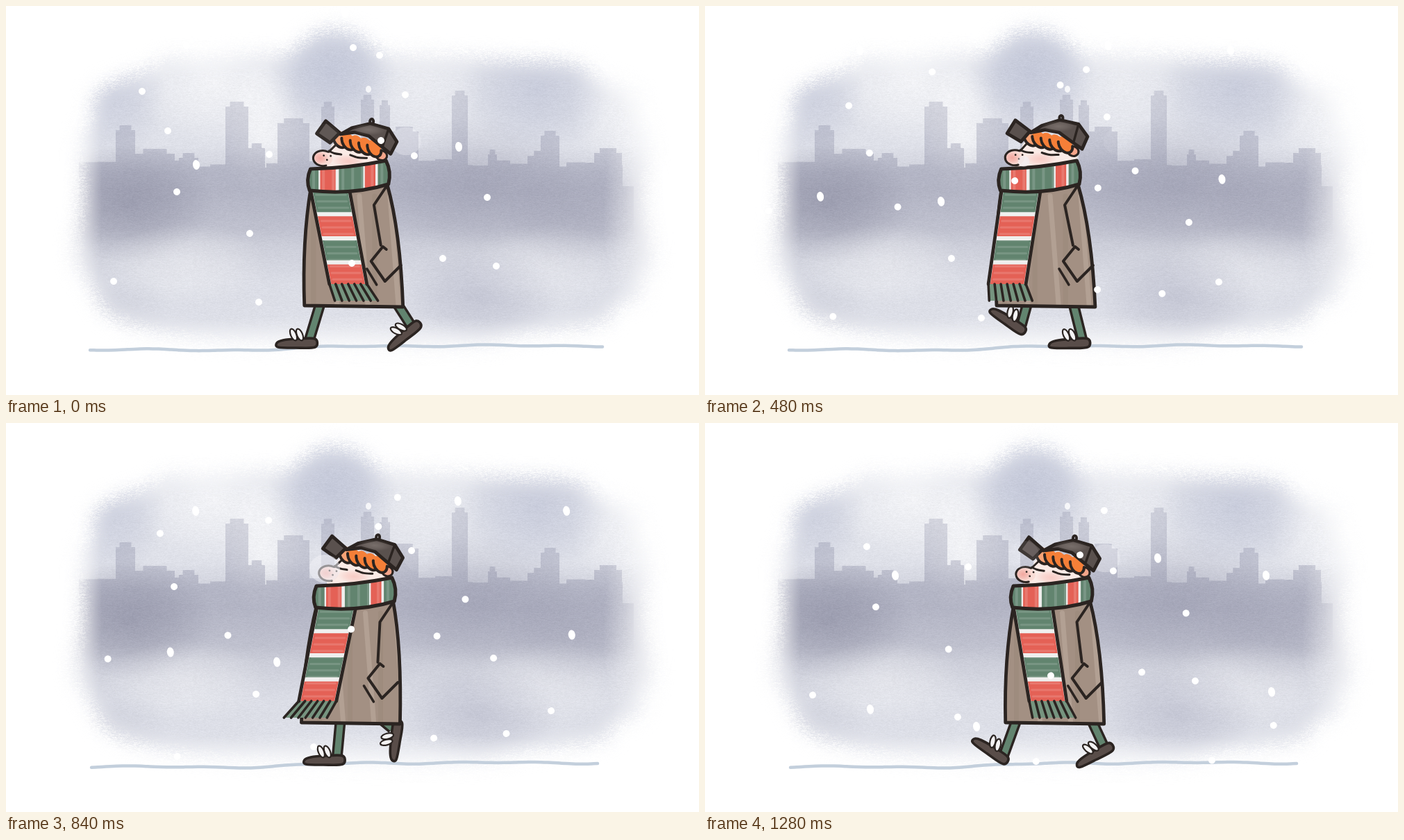
An HTML page with a canvas for the animation above (1.32 s loop, 998 by 561 pixels).

```html
<!DOCTYPE html>
<html lang="en">
<head>
<meta charset="utf-8">
<title>Winter walk</title>
<style>
html, body { margin: 0; width: 100%; height: 100%; overflow: hidden; background: #fff; }
canvas { display: block; width: 998px; height: 561px; }
</style>
</head>
<body>
<canvas id="stage" width="998" height="561"></canvas>
<script>
const W = 998, H = 561, LOOP = 1320, STEP = 40, TAU = 2 * Math.PI;
const INK = '#2b2421', GREEN = '#62846f', RED = '#e46156', COAT = '#a39083', FELT = '#5a514e', SHOE = '#594d49', WOOL = '#efeeed';
const stage = document.getElementById('stage').getContext('2d');
let g = stage;

// ---------- helpers ----------
const pairs = a => Array.from({ length: a.length / 2 }, (_, i) => [a[2 * i], a[2 * i + 1]]);
const mix = (a, b, f) => a.map((v, i) => v + (b[i] - v) * f);
const wave = (t, peak, period = LOOP) => Math.cos(TAU * (t - peak) / period);
const mod = (a, n) => (a % n + n) % n;

// smooth 0 to 1 between two limits
function ramp(v, from, to) {
  const u = Math.max(0, Math.min(1, (v - from) / (to - from)));
  return u * u * (3 - 2 * u);
}

function randomFrom(seed) {
  return () => (seed = (seed * 1664525 + 1013904223) >>> 0) / 4294967296;
}

function line(pts, closed) {
  g.beginPath();
  pts.forEach(p => g.lineTo(...p));
  if (closed) g.closePath();
}

function curve(pts, closed) {
  const n = pts.length;
  const p = i => closed ? pts[(i + n) % n] : pts[Math.max(0, Math.min(n - 1, i))];
  g.beginPath();
  g.moveTo(...pts[0]);
  for (let i = 0; i < (closed ? n : n - 1); i++) {
    const [a, b, c, d] = [p(i - 1), p(i), p(i + 1), p(i + 2)];
    g.bezierCurveTo(b[0] + (c[0] - a[0]) / 6, b[1] + (c[1] - a[1]) / 6,
      c[0] - (d[0] - b[0]) / 6, c[1] - (d[1] - b[1]) / 6, ...c);
  }
}

function fill(color) { g.fillStyle = color; g.fill(); }
function ink(width = 4, color = INK) { g.lineWidth = width; g.strokeStyle = color; g.stroke(); }
function oval(x, y, rx, ry, turn = 0, from = 0, to = TAU) {
  g.beginPath();
  g.ellipse(x, y, rx, ry, turn, from, to);
}

function blob(x, y, rx, ry, rgb, alpha) {
  g.save();
  g.translate(x, y);
  g.scale(rx, ry);
  const soft = g.createRadialGradient(0, 0, 0, 0, 0, 1);
  soft.addColorStop(0, `rgba(${rgb},${alpha})`);
  soft.addColorStop(.5, `rgba(${rgb},${alpha * .6})`);
  soft.addColorStop(1, `rgba(${rgb},0)`);
  oval(0, 0, 1, 1);
  fill(soft);
  g.restore();
}

// ---------- watercolour backdrop ----------
// left, width, top
const TOWERS = [
  [158, 28, 172], [186, 57, 206], [249, 28, 212], [316, 33, 138], [349, 24, 198],
  [391, 46, 162], [454, 19, 138], [511, 19, 128], [538, 15, 136], [553, 41, 174],
  [642, 23, 122], [694, 13, 207], [751, 46, 209], [770, 27, 180], [847, 40, 205]];

function fade(rgb, stops) {
  const grad = g.createLinearGradient(0, 100, 0, 500);
  stops.forEach(([y, a]) => grad.addColorStop((y - 100) / 400, `rgba(${rgb},${a})`));
  return grad;
}

function hazeOutline(random) {
  return Array.from({ length: 40 }, (_, i) => {
    const a = i / 40 * TAU, round = v => Math.sign(v) * Math.abs(v) ** .5;
    const wobble = .97 + random() * .05;
    return [515 + 412 * round(Math.cos(a)) * wobble, 277 + 208 * round(Math.sin(a)) * wobble];
  });
}

function paintSkyline(random) {
  g.beginPath();
  for (let x = 105; x < 888; x += 27) {
    const top = 221 + random() * 12;
    g.rect(x, top, 27, 400 - top);
  }
  g.rect(888, 260, 16, 140);
  TOWERS.forEach(([x, w, top]) => {
    g.rect(x, top + 7, w, 393 - top);
    g.rect(x + w * .2, top, w * .6, 400 - top);
  });
  fill(fade('138,140,164', [[120, .26], [200, .34], [240, .42], [265, .34], [345, 0]]));
}

// breaks up the wash edges like rough paper
function grain(random) {
  const img = g.getImageData(0, 0, W, H), d = img.data;
  let n = .5;
  for (let i = 0; i < d.length; i += 4) {
    n = n * .45 + random() * .55;
    const a = d[i + 3] / 255;
    if (!a) continue;
    d[i + 3] = 255 * (a + (n - .5) * Math.min(1, 4 * a * (1 - a)) * .9);
    for (let k = 0; k < 3; k++) d[i + k] += (n - .5) * 14;
  }
  g.putImageData(img, 0, 0);
}

function paintBackdrop() {
  const sheet = document.createElement('canvas'), random = randomFrom(7);
  sheet.width = W;
  sheet.height = H;
  g = sheet.getContext('2d');
  g.filter = 'blur(14px)';
  curve(hazeOutline(random), true);
  fill('#dfe1e9');
  oval(474, 90, 62, 56);
  fill('#d6d9e4');
  g.filter = 'none';
  g.globalCompositeOperation = 'source-atop';
  const white = '255,255,255', blue = '182,187,208', slate = '140,141,163';
  blob(300, 110, 120, 90, white, .6);
  blob(370, 180, 60, 100, white, .6);
  blob(600, 110, 90, 100, white, .35);
  blob(900, 130, 90, 130, white, .6);
  blob(470, 95, 95, 90, blue, .55);
  blob(155, 125, 75, 100, blue, .45);
  blob(765, 120, 110, 95, blue, .55);

  paintSkyline(random);
  g.fillStyle = fade('150,151,171', [[200, 0], [265, .36], [320, .36], [400, .05], [500, 0]]);
  g.fillRect(0, 100, W, 400);

  blob(180, 285, 120, 85, '125,126,148', .45);
  blob(680, 260, 150, 100, slate, .35);
  blob(820, 300, 110, 70, slate, .3);
  blob(680, 420, 120, 70, '178,180,198', .55);
  blob(150, 435, 90, 60, '195,197,210', .4);
  blob(260, 372, 120, 60, white, .35);
  blob(780, 375, 120, 60, white, .25);
  blob(935, 300, 75, 230, white, .7);
  blob(88, 270, 50, 270, white, .65);
  blob(85, 70, 90, 70, white, .7);
  blob(500, 500, 430, 55, white, .6);
  g.globalCompositeOperation = 'source-over';
  grain(random);
  g = stage;
  return sheet;
}

// ---------- walk cycle ----------
const sway = t => 8 * wave(2 * t, 780) - 20 * wave(t, 390);

function bodyPose(t) {
  return {
    left: 436 + sway(t), width: 117, bottom: 269,
    hem: 497 + sway(t - 60) / 2,
    scarfEnd: 462 - 32 * wave(t, 600),
    fringe: 463 - 42 * wave(t, 690),
    bob: 3 + 3 * wave(t, 40, LOOP / 2),
    tilt: (2.5 - 3 * wave(t, 390)) * Math.PI / 180
  };
}

// half a loop on the ground sliding back, half a loop swinging forward
function footPose(t) {
  const p = mod(t, LOOP), half = LOOP / 2;
  const x = p < half ? 437 + 146 * p / half : 506 + 77 * Math.cos(Math.PI * (p - half) / half);
  const lift = Math.sin(Math.PI * Math.max(0, p - 480) / 840) ** 1.5;
  const angle = -85 * ramp(p, 450, 900) + 120 * ramp(p, 960, 1140);
  return { x, y: 479 - 42 * lift, angle };
}

// ---------- walker ----------
function drawLeg({ x, y, angle }, hem) {
  const thigh = [[hem + (x - hem) * .75, 428], [x, y + 2]];
  g.lineCap = 'butt';
  line(thigh);
  ink(16);
  line(thigh);
  ink(9, GREEN);
  g.lineCap = 'round';
  g.save();
  g.translate(x, y);
  g.rotate(angle * Math.PI / 180);
  curve(pairs([8, 1, 8, 13, -20, 14, -45, 13, -47, 7, -38, 3, -18, 1]), true);
  fill(SHOE);
  ink(3.6);
  for (const lace of [-23, -14]) {
    oval(lace, -5, 4, 9, -.4);
    fill('#f4f3f4');
    ink(2.2);
  }
  g.restore();
}

function drawCoat({ left, width, bottom, hem }) {
  const hemL = hem - 71, hemR = hem + 71, right = left + width;
  const outline = () => {
    g.beginPath();
    g.moveTo(left + 4, bottom - 6);
    g.quadraticCurveTo((left + hemL) / 2 - 6, 340, hemL, 432);
    g.lineTo(hemR, 434);
    g.quadraticCurveTo((right + hemR) / 2 + 6, 325, right - 3, bottom - 12);
  };
  outline();
  fill(COAT);
  g.save();
  g.clip();
  for (let i = 0; i < 6; i++) {
    const x = left + 8 + i * 22;
    line([[x, bottom + 5], [x + (i % 2) * 12, 430]]);
    ink(7, i % 2 ? 'rgba(255,240,230,.16)' : 'rgba(95,72,60,.06)');
  }
  g.restore();
  outline();
  ink(4.8);

  line([[right - 4, bottom - 9], [right - 22, 287], [hemR - 32, 345]]);
  ink(4);
  line([[hemR - 24, 351], [hemR - 29, 347], [hemR - 46, 368], [hemR - 26, 397], [hemR - 3, 374]]);
  ink(4);
  line([[hemR - 52, 379], [hemR - 38, 402]]);
  ink(3.5);
}

function drawScarf({ left, bottom, scarfEnd, fringe }) {
  const edge = side => v => mix([left + 32 + side * 28, bottom - 2], [scarfEnd + side * 27, 401], v);
  const tip = side => [fringe + side * 31, 425];
  const L = edge(-1), R = edge(1);
  const band = (a, b, color, inset) => {
    line([mix(L(a), R(a), inset), mix(R(a), L(a), inset), mix(R(b), L(b), inset), mix(L(b), R(b), inset)], true);
    fill(color);
  };
  band(0, 1, WOOL, 0);
  [GREEN, RED, GREEN, RED].forEach((color, i) => band(i * .26 + .01, i * .26 + .225, color, .05));
  for (let v = .04; v < 1; v += .07) {
    line([mix(L(v), R(v), .12), mix(L(v), R(v), .88)]);
    ink(3, 'rgba(255,255,255,.14)');
  }
  line([L(1), R(1), tip(1), tip(-1)], true);
  fill('#76947f');
  for (const side of [L, R]) {
    line([side(0), side(1)]);
    ink(4.8);
  }
  for (let i = 0; i <= 6; i++) {
    line([mix(L(1), R(1), i / 6), mix(tip(-1), tip(1), i / 6)]);
    ink(3.6);
  }
}

function drawFace() {
  curve(pairs([457, 194, 490, 188, 524, 200, 530, 212, 522, 230, 455, 238, 438, 226, 450, 205]), true);
  fill('#fbebe6');
  blob(478, 219, 24, 10, '240,130,120', .3);
  oval(441, 217, 14, 11);
  fill('#f9ddd6');
  blob(437, 217, 13, 10, '235,115,105', .5);
  oval(441, 217, 14, 11, 0, 1.2, 5.2);
  ink(3);
  line([[449, 207], [459, 196]]);
  ink(3);
  for (const [x, y] of [[442, 213], [447, 219], [452, 213]]) {
    oval(x, y, 1.4, 1.4);
    fill(INK);
  }
  curve([[449, 206], [457, 209], [467, 210]]);
  ink(3);
  curve([[480, 210], [491, 213], [504, 213]]);
  ink(3);
  oval(525, 208, 8, 7, .3);
  fill('#f4a58a');
  ink(3.2);
}

function drawHair() {
  for (let i = 0; i < 5; i++) {
    const x = 464 + i * 12.5, y = 188 + i * 2.6;
    oval(x, y, 9, 13, -.55);
    fill(i ? '#f57f38' : '#f6a376');
    oval(x, y, 9, 13, -.55, .6, 3.9);
    ink(4);
  }
}

function drawHat() {
  line(pairs([442, 163, 463, 179, 450, 194, 430, 182]), true);
  fill(FELT);
  ink(4.8);
  oval(508, 160, 2.5, 3.5);
  ink(4);
  line(pairs([464, 181, 480, 171, 506, 163, 533, 169, 546, 187, 538, 205, 524, 195, 505, 181, 485, 177]), true);
  fill(FELT);
  ink(4.8);
  blob(504, 172, 24, 8, '150,140,135', .5);
  line([[533, 169], [526, 194]]);
  ink(3.5);
}

function drawHead({ left, bob, tilt }) {
  g.save();
  g.translate(left + 77, 190 + bob);
  g.rotate(tilt);
  g.translate(-495, -190);
  drawFace();
  drawHair();
  drawHat();
  g.restore();
}

function drawCollar({ left, width, bottom }) {
  const at = (u, dy) => [left + u * width, bottom + dy];
  const outline = () => {
    g.beginPath();
    g.moveTo(...at(.03, -34));
    g.quadraticCurveTo(...at(.5, -35), ...at(.96, -46));
    g.quadraticCurveTo(...at(1.03, -30), ...at(.99, -12));
    g.quadraticCurveTo(...at(.55, 4), ...at(.02, -3));
    g.quadraticCurveTo(...at(-.03, -18), ...at(.03, -34));
    g.closePath();
  };
  outline();
  fill(WOOL);
  g.save();
  g.clip();
  for (const [a, b, color] of [[0, .13, GREEN], [.15, .34, RED], [.38, .68, GREEN], [.7, .83, RED], [.86, 1, GREEN]]) {
    line([at(a, -50), at(b, -50), at(b, 5), at(a, 5)], true);
    fill(color);
  }
  for (let u = .07; u < 1; u += .12) {
    line([at(u, -40), at(u, -4)]);
    ink(4, 'rgba(255,255,255,.15)');
  }
  g.restore();
  outline();
  ink(5);
}

// ---------- breath, snow, ground ----------
function drawPuff(x, y, r, alpha) {
  oval(x, y, r, r * .92);
  fill(`rgba(240,241,246,${alpha})`);
}

function drawBreath(t) {
  const age = mod(t - 440, LOOP) / LOOP;
  drawPuff(459, 224 - 34 * ramp(age, .15, .5), 8 + 14 * ramp(age, 0, .3), .55 * (1 - ramp(age, .4, .72)));
}

const along = (x, y, dx, dy, from, to) =>
  Array.from({ length: to - from + 1 }, (_, i) => [x + dx * (from + i), y + dy * (from + i)]);
const shift = (pts, dx, dy) => pts.map(([x, y]) => [x + dx, y + dy]);

// each flake moves on by one point per loop, where the next one takes over
const DRIFTING = pairs([196, 123, 233, 180, 246, 268, 351, 328, 364, 427, 477, 490]);
const CURLING = pairs([500, 60, 540, 194, 629, 364, 730, 490]);
const SNOW = [
  { trails: [DRIFTING, shift(DRIFTING, 342, -52)], sway: [0, 1], sag: 1, height: 5 },
  { trails: [CURLING, shift(CURLING, -474, 33)], sway: [.15, .75], sag: .9, height: 5 },
  { trails: [along(274, 229, 117, 218, -1, 1), along(808, 229, 117, 218, -1, 0),
             along(652, 203, 164, 193, -1, 1), along(73, 228, 165, 193, 0, 1)], sway: [0, .67], sag: 1.4, height: 7 },
  { trails: [along(379, 214, 119, 157, -1, 2)], sway: [0, .67], sag: 1.4, height: 5 }];

function drawSnow(t) {
  const u = t / LOOP;
  oval(522, 120, 4, 5);
  fill('rgba(255,255,255,.8)');
  for (const { trails, sway: [from, to], sag, height } of SNOW) {
    for (const trail of trails) {
      trail.slice(1).forEach(([x, y], i) => {
        const [x0, y0] = trail[i];
        oval(x0 + (x - x0) * ramp(u, from, to), y0 + (y - y0) * u ** sag, 5, height, -.15);
        fill('#fff');
      });
    }
  }
}

function drawGround(t) {
  const boil = Math.floor(t / 160) % 3, pts = [];
  for (let x = 121 + boil; x <= 866 - boil * 5; x += 9) {
    const rise = 6 * ramp(x, 340, 540);
    pts.push([x, 496 - rise + Math.sin(x / 19 + boil) * .8 + Math.sin(x / 41) * .9]);
  }
  curve(pts);
  ink(4.5, '#c3cfdc');
}

const backdrop = paintBackdrop();
const start = performance.now();

function render() {
  const t = Math.floor((performance.now() - start) / STEP) * STEP % LOOP;
  const body = bodyPose(t);
  const feet = [footPose(t), footPose(t + LOOP / 2)].sort((a, b) => a.y - b.y);

  g.fillStyle = '#fff';
  g.fillRect(0, 0, W, H);
  g.drawImage(backdrop, 0, 0);
  g.lineCap = g.lineJoin = 'round';
  drawGround(t);
  drawPuff(588 - 12 * wave(t, 0), 195, 22, .17 + .17 * wave(t, 0));
  feet.forEach(foot => drawLeg(foot, body.hem));
  drawCoat(body);
  drawScarf(body);
  drawHead(body);
  drawCollar(body);
  drawBreath(t);
  drawSnow(t);
  requestAnimationFrame(render);
}
render();
</script>
</body>
</html>
```
